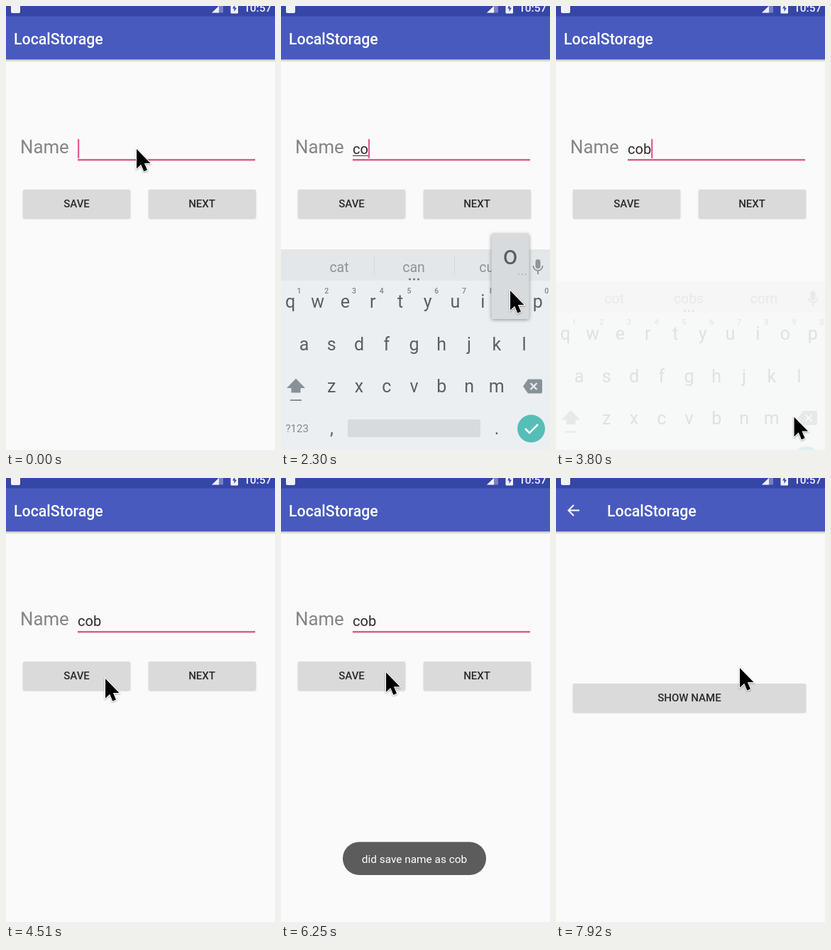
Write an HTML page that moves like this. It is 379x624 px and loops after 8000 ms.

```html
<!DOCTYPE html>
<html lang="en">
<head>
<meta charset="utf-8">
<title>LocalStorage</title>
<style>
html, body { margin: 0; width: 100%; height: 100%; overflow: hidden; background: #fafafa; }
svg { display: block; width: 379px; height: 624px; font-family: Roboto, sans-serif; }
.mid { text-anchor: middle; }
.title { font-size: 21.3px; font-weight: 500; fill: #fff; }
.label { font-size: 15px; font-weight: 500; fill: #2a2a2a; text-anchor: middle; }
.btn { fill: #dadada; filter: drop-shadow(0 1px 1px #0003); }
.up { filter: drop-shadow(0 1px 2.5px #0006); }
.key { font-size: 25px; fill: #566168; text-anchor: middle; }
.hint { font-size: 10.5px; font-weight: 500; fill: #7d878c; text-anchor: middle; }
.word { font-size: 19.5px; fill: #8a9499; text-anchor: middle; }
</style>
</head>
<body>
<svg viewBox="0 0 379 624">
  <defs>
    <linearGradient id="shade" x2="0" y2="1">
      <stop stop-color="#000" stop-opacity=".25"/><stop offset="1" stop-color="#000" stop-opacity="0"/>
    </linearGradient>
    <clipPath id="buttons"><rect x="24" y="258" width="151" height="40" rx="2"/><rect x="201" y="258" width="151" height="40" rx="2"/></clipPath>
    <g id="bar"><path fill="#495abf" d="M0 0h379v75H0z"/><path fill="url(#shade)" d="M0 75h379v4H0z"/></g>
  </defs>
  <path fill="#fafafa" d="M0 0h379v624H0z"/>

  <use href="#bar"/>
  <text class="title" x="11" y="53.5">LocalStorage</text>
  <text x="20" y="207" font-size="25.8" fill="#858585">Name</text>
  <text id="typed" x="101" y="208" font-size="20" fill="#2c2c2c"></text>
  <path id="compose" stroke="#333" stroke-width="1"/>
  <path fill="#e6588f" d="M101 215h250v2.4H101z"/>
  <rect id="caret" y="187" width="2.2" height="27" fill="#e6588f"/>
  <rect class="btn" x="24" y="258" width="151" height="40" rx="2"/>
  <rect id="next" class="btn" x="201" y="258" width="151" height="40" rx="2"/>
  <circle id="ripple" clip-path="url(#buttons)"/>
  <text class="label" x="99.5" y="283">SAVE</text>
  <text class="label" x="276" y="283">NEXT</text>

  <g id="second">
    <path fill="#fafafa" d="M0 14h379v610H0z"/>
    <use href="#bar"/>
    <path d="M33 45.5H18M25 38l-7.5 7.5L25 53" fill="none" stroke="#fff" stroke-width="2"/>
    <text class="title" x="72" y="53.5">LocalStorage</text>
    <rect class="btn" x="24" y="289" width="328" height="40" rx="2"/>
    <text class="label" x="188" y="314">SHOW NAME</text>
  </g>

  <path fill="#3646a7" d="M0 0h379v14.5H0z"/>
  <g fill="#f0f1fa">
    <rect x="7" y="-3" width="13" height="13" rx="2"/>
    <path d="M290 9.500L306-6V9.500z" opacity=".35"/>
    <path d="M290 9.500L300 0V9.500z"/>
    <rect x="316.500" y="-5" width="10.500" height="15.500" rx="1"/>
    <path d="M322.500-2l-3.500 5.500h2.500V8l3.500-5.500h-2.500z" fill="#3646a7"/>
    <text x="335" y="8" font-size="15.500" font-weight="500">10:57</text>
  </g>

  <g id="keyboard">
    <path fill="#eceff1" d="M0 342h379v282H0z"/>
    <path fill="#e4e7e9" d="M0 342h379v44H0z"/>
    <text id="notice" x="45" y="373" font-size="16.300" fill="#59646a">Suggest contact names? Touch for info.</text>
    <g id="words">
      <path d="M131.500 352v26M244.500 352v26" stroke="#d3d7d9"/>
      <text class="word" x="82" y="373.500"></text>
      <text class="word" x="187" y="373.500"></text>
      <text class="word" x="293" y="373.500"></text>
      <path d="M181.500 384h13" stroke="#66727a" stroke-width="3" stroke-linecap="round" stroke-dasharray="0 6"/>
    </g>
    <g stroke="#8b969b" fill="none" stroke-width="2">
      <rect x="359.500" y="357" width="5" height="11" rx="2.500" fill="#8b969b"/>
      <path d="M355.500 365c0 9 13 9 13 0M362 372v5"/>
    </g>
    <g id="keys"></g>
    <path fill="#879298" d="M21 523.500L34 537h-6.500v6.500h-13V537H8zM13 553h16v2H13z"/>
    <path fill="#879298" d="M341 534.500l7-10h18q2 0 2 2v16q0 2-2 2h-18z"/>
    <path d="M351.500 530l9 9m0-9l-9 9" stroke="#eceff1" stroke-width="2.200"/>
    <text x="6.500" y="599" font-size="15" fill="#7f8a90">?123</text>
    <text class="key" x="71.500" y="602">,</text>
    <rect x="94" y="581" width="187" height="25" rx="3" fill="#d8dbdd"/>
    <text class="key" x="304" y="602">.</text>
    <circle cx="352.500" cy="594" r="19.500" fill="#55beb6"/>
    <path d="M344 594l6 6 12-12" fill="none" stroke="#fff" stroke-width="2.500"/>
    <g id="popup">
      <rect class="up" x="-26.500" y="-104" width="53" height="120" rx="3" fill="#d8dbdd"/>
      <text class="mid" y="-61" font-size="36" fill="#525d64"></text>
      <path d="M12-47h12" stroke="#a8b0b4" stroke-width="2" stroke-linecap="round" stroke-dasharray="0 5"/>
    </g>
  </g>

  <g id="toast">
    <rect x="87" y="511.500" width="202" height="46.500" rx="23.250" fill="#5c5c5c"/>
    <text class="mid" x="188" y="541" font-size="15.400" fill="#fff">did save name as cob</text>
  </g>

  <path id="pointer" d="M0 0V27.500L6.200 21.700 10.300 31.500 15 29.500 10.900 19.900H19.500z"
    fill="#000" stroke="#fff" stroke-width="2" paint-order="stroke" style="filter:drop-shadow(0 1px 1px #0005)"/>
</svg>
<script>
const $ = id => document.getElementById(id);
const set = (el, attrs) => { for (const k in attrs) el.setAttribute(k, attrs[k]); };
const show = (el, on) => set(el, { visibility: on ? 'visible' : 'hidden' });
const ramp = (t, a, b) => Math.min(1, Math.max(0, (t - a) / (b - a)));
const smooth = p => p * p * (3 - 2 * p);
const out = p => 1 - (1 - p) ** 2;

const LOOP = 8000;
const NAME = 'cob';
const EDITS = [1600, 2240, 2690];
const HIDE = 3690;
const SUGGESTIONS = [
  [1660, 'cat can cut'],
  [2420, 'con come cost'],
  [2830, 'cot cobs corn']
].map(([at, list]) => ({ at, list: list.split(' ') }));

// Pointer stops: time, x, y
const PATH = [
  [0, 184, 201], [330, 184, 201], [960, 108, 474], [1350, 108, 474], [1540, 148, 529],
  [1700, 148, 529], [2180, 323, 400], [2380, 323, 400], [2640, 229, 531], [2840, 229, 531],
  [3350, 351, 601], [3700, 351, 601], [4310, 140, 282], [4590, 140, 282], [4770, 135, 274],
  [6120, 135, 274], [6770, 259, 267], [LOOP, 259, 267]
];

const keys = {};
[['qwertyuiop', 13, 424], ['asdfghjkl', 32.5, 484], ['zxcvbnm', 71.3, 543]].forEach(([row, x0, y], r) => {
  [...row].forEach((char, i) => {
    const x = x0 + 38.75 * i;
    keys[char] = [x, y];
    $('keys').innerHTML += `<text class="key" x="${x}" y="${y}">${char}</text>` +
      (r ? '' : `<text class="hint" x="${x + 12.5}" y="403.500">${(i + 1) % 10}</text>`);
  });
});

function pointerAt(t) {
  const i = PATH.findIndex(stop => stop[0] > t);
  const [t0, x0, y0] = PATH[i - 1], [t1, x1, y1] = PATH[i];
  const p = smooth(ramp(t, t0, t1));
  return [x0 + (x1 - x0) * p, y0 + (y1 - y0) * p];
}

function drawField(t) {
  const text = NAME.slice(0, EDITS.filter(at => t >= at).length);
  $('typed').textContent = text;
  const width = text ? $('typed').getComputedTextLength() : 0;
  const last = [0, 180, ...EDITS].filter(at => t >= at).pop();
  set($('caret'), { x: 101 + width });
  show($('caret'), (t - last) % 1000 < 500);
  set($('compose'), { d: `M101 210.500h${width}` });
  show($('compose'), width && t < HIDE - 40);
}

function drawKeyboard(t) {
  const level = out(ramp(t, 350, 500)) * (1 - ramp(t, HIDE, HIDE + 132));
  set($('keyboard'), { opacity: level, transform: `translate(0 ${53 * (1 - level)})` });

  const current = SUGGESTIONS.filter(s => t >= s.at).pop();
  show($('notice'), !current);
  show($('words'), current);
  if (current) $('words').querySelectorAll('text').forEach((el, i) => el.textContent = current.list[i]);

  const pressed = EDITS.findIndex(at => t >= at - 60 && t < at + 130);
  show($('popup'), pressed >= 0);
  if (pressed >= 0) {
    set($('popup'), { transform: `translate(${keys[NAME[pressed]]})` });
    $('popup').querySelector('text').textContent = NAME[pressed];
  }
}

function drawButtons(t) {
  const [start, x, y] = t < 7000 ? [5000, 137, 276] : [7230, 260, 268];
  set($('ripple'), {
    cx: x, cy: y,
    r: 137 * Math.sqrt(ramp(t, start, start + 500)),
    opacity: .08 * (1 - ramp(t, start + 300, start + 650))
  });
  set($('next'), { class: t > 7130 ? 'btn up' : 'btn' });
}

function draw(t) {
  drawField(t);
  drawKeyboard(t);
  drawButtons(t);
  set($('toast'), { opacity: out(ramp(t, 5125, 5625)) * (1 - ramp(t, 6925, 7425) ** 2) });
  const enter = out(ramp(t, 7430, 7740));
  set($('second'), { opacity: enter, transform: `translate(0 ${50 * (1 - enter)})` });
  set($('pointer'), { transform: `translate(${pointerAt(t)})` });
}

function tick() {
  draw(performance.now() % LOOP);
  requestAnimationFrame(tick);
}
tick();
</script>
</body>
</html>
```
